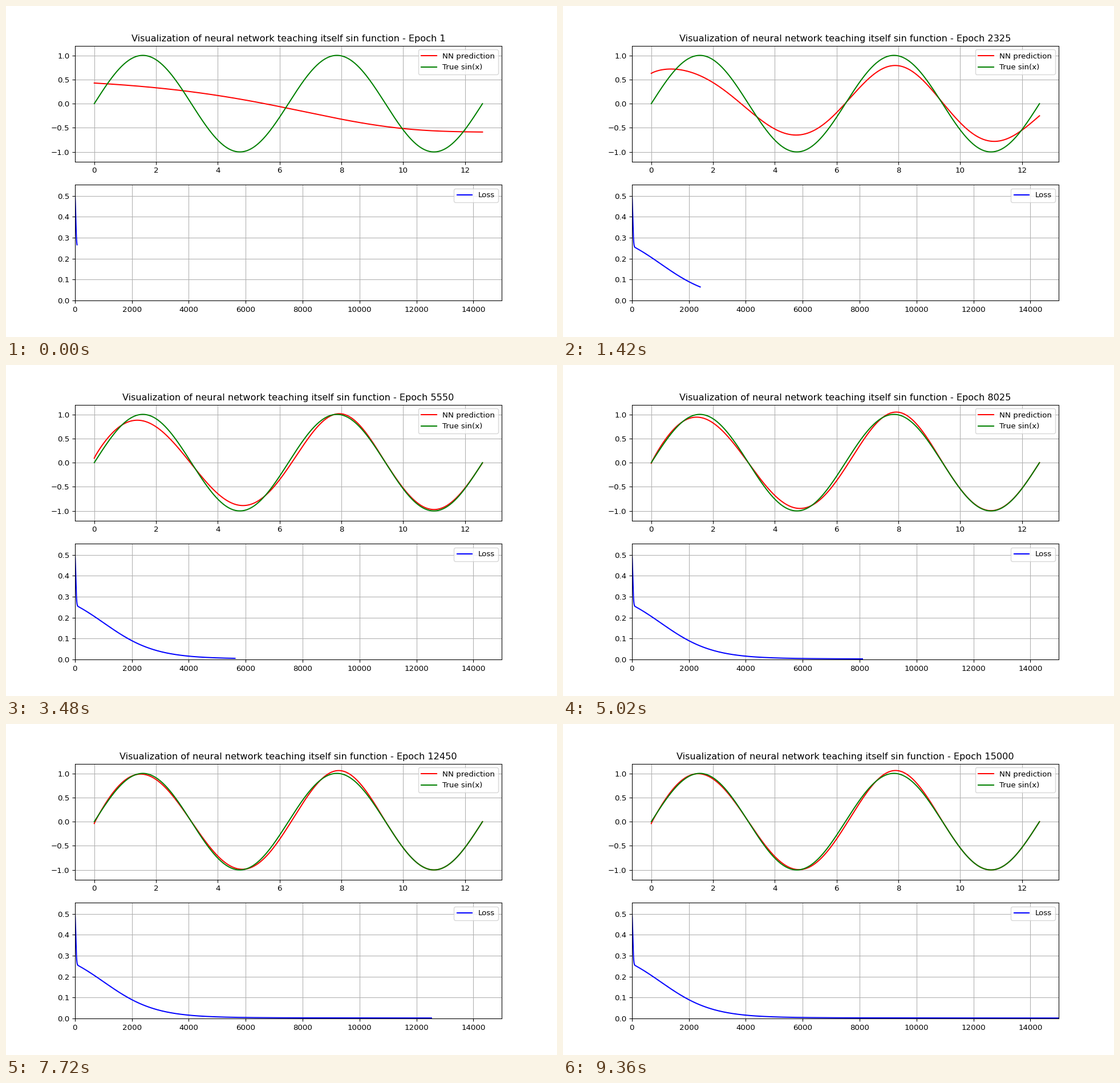
Recreate the animation shown at these times as a matplotlib script. Size 966 by 580 pixels, loop 9.38 s.

```python
import matplotlib.pyplot as plt
import numpy as np
from matplotlib.animation import FuncAnimation

DPI = 96.6
TICK_MS = 20
TICKS = 469
STEP = 75            # epochs per pose
LAST = 15000
END = 4 * np.pi

x = np.linspace(0, END, 500)
right = (1 + np.tanh((x - END / 2) / 1.5)) / 2       # 0 on the left half, 1 on the right
start = -.59 + 1.14 * np.exp(-np.exp((x - 6.83) / 3.15))
head = np.exp(-(x / 2.42) ** 1.4)
tail = np.exp((x - END) / 1.3)
wobble = np.sin(2 * np.pi * np.minimum(x / 9.4, 1) ** .65)
bump = np.exp(-(x - 7.9) ** 2)


def burst(epoch):
    """Share of the untrained state left after the first quick steps."""
    return np.exp(-(epoch / 42) ** 2)


def slow(epoch):
    """Logistic decay that governs the main part of the training."""
    return 1 / (1 + np.exp((epoch - 1021) / 900))


def loss_at(epoch):
    floor = .0022 + .0045 * np.exp(-epoch / 6000)
    return .337 * slow(epoch) + floor + .241 * burst(epoch)


def prediction(epoch):
    """Sine whose amplitude, phase and offset errors fade with training."""
    d = slow(epoch) ** .6
    learned = (1 - d) ** 3
    amp_left = 1 - .655 * np.exp(-epoch / 3300)
    amp_right = 1 - .59 * d
    amp = amp_left + (amp_right - amp_left) * right
    phase = ((2.95 * d - .04) * head - 2.4 * d * d * tail
             + .18 * learned * np.exp(-epoch / 20000) * wobble)
    fit = (amp * np.sin(x + phase) + .3 * d * d * (1 - right)
           + .06 * learned * bump)
    return fit + burst(epoch) * (start - fit)


epochs = np.arange(LAST + STEP + 1)
loss = loss_at(epochs)

fig, (top, low) = plt.subplots(2, 1, figsize=(966 / DPI, 580 / DPI), dpi=DPI)
nn_line, = top.plot(x, start, "r", label="NN prediction")
top.plot(x, np.sin(x), "g", label="True sin(x)")
loss_line, = low.plot([], [], "b", label="Loss")
title = top.set_title("", y=1.0)

top.set_xlim(-.05 * END, 1.05 * END)
top.set_ylim(-1.2, 1.2)
top.set_xticks(range(0, 13, 2))
top.set_yticks(np.arange(-2, 3) / 2)
low.set_xlim(0, LAST)
low.set_ylim(0, 1.1 * loss[0])
low.set_xticks(range(0, LAST, 2000))
low.set_yticks(np.arange(6) / 10)
for ax in (top, low):
    ax.grid(True)
    ax.legend(loc="upper right")
    # Fixed label spots spare a second tick layout per draw
    ax.xaxis.set_label_coords(.5, -.15)
    ax.yaxis.set_label_coords(-.08, .5)


def update(tick):
    # Three poses per seven ticks, held for 1, 5 and 1 ticks
    block, r = divmod(tick, 7)
    epoch = STEP * (3 * block + (r > 0) + (r == 6))
    nn_line.set_ydata(prediction(epoch))
    end = epoch + STEP + 1
    loss_line.set_data(epochs[:end], loss[:end])
    title.set_text("Visualization of neural network teaching itself "
                   f"sin function - Epoch {max(1, epoch)}")
    return nn_line, loss_line, title


anim = FuncAnimation(fig, update, frames=TICKS, interval=TICK_MS,
                     repeat=True, repeat_delay=0)
plt.show()
```
